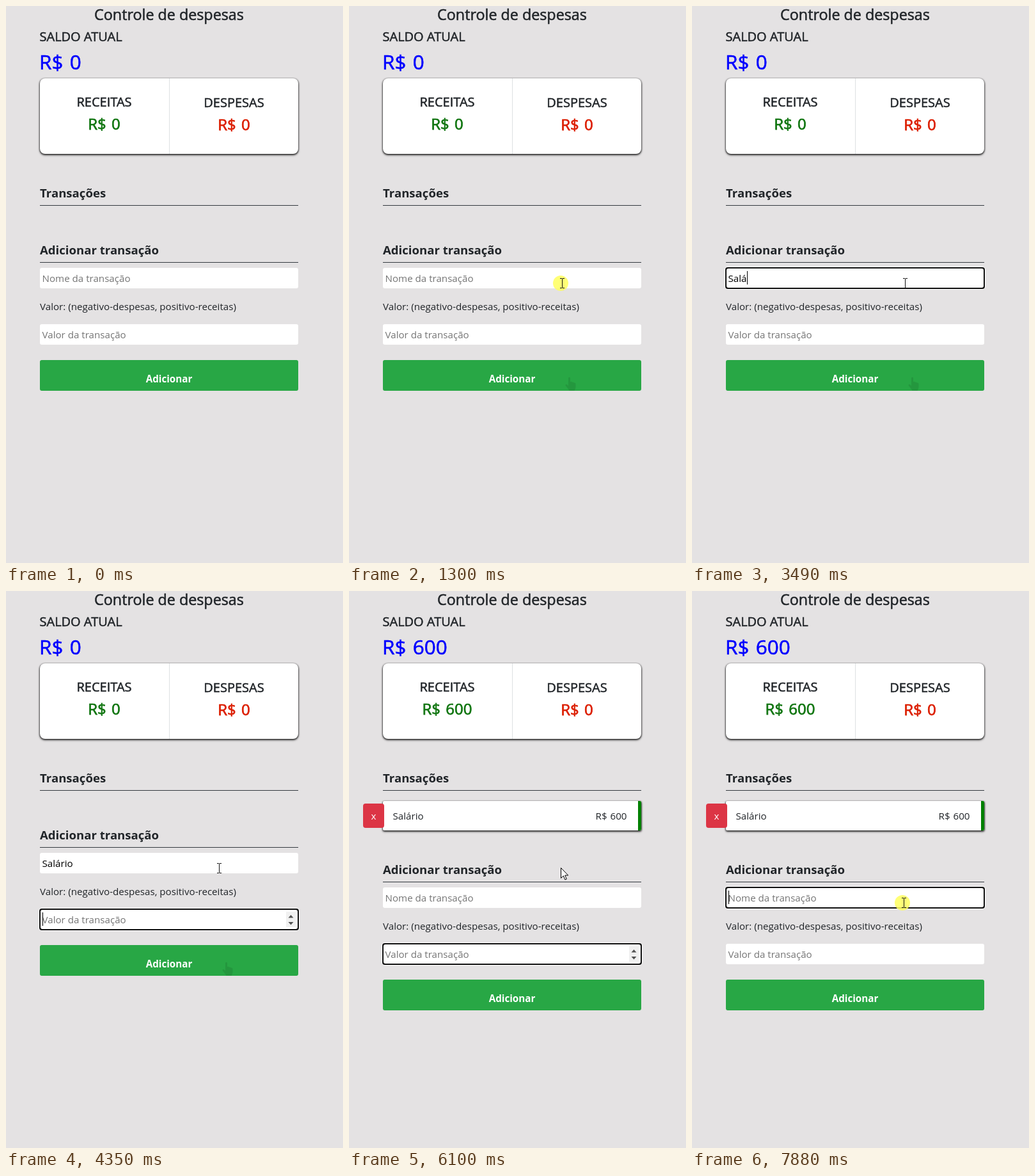
An HTML page that plays this animation: 527x870 px, repeating every 8 s.

```html
<!DOCTYPE html>
<html lang="pt">
<head>
<meta charset="utf-8">
<title>Controle de despesas</title>
<style>
  html, body { margin: 0; width: 100%; height: 100%; overflow: hidden; background: #e4e2e3; }
  svg { display: block; width: 527px; height: 870px; font: 15.15px "Open Sans", "Noto Sans", sans-serif; color: #212529; }
  text { fill: currentColor; white-space: pre; }
  .mid { text-anchor: middle; }
  .end { text-anchor: end; }
  .medium { stroke: currentColor; stroke-width: .55px; }
  .title { font-size: 23.3px; }
  .label { font-size: 20px; }
  .total { font-size: 31.5px; word-spacing: 2px; color: #00f; }
  .sum { font-size: 24px; word-spacing: 2px; stroke-width: .75px; }
  .head { font-size: 18.6px; font-weight: 700; }
  .button { font-size: 15.2px; font-weight: 700; color: #fff; }
  .card { fill: #fff; filter: drop-shadow(0 1px 1.5px #000) drop-shadow(0 1px 1px rgba(0, 0, 0, .4)); }
  .rule { fill: #343a40; }
  .hint { color: #757575; }
  .typed { color: #000; }
  .ring { fill: #fff; }
  .ring + .ring { fill: #101010; }
  .pointer { fill: #fff; stroke: #000; stroke-linejoin: round; }
</style>
</head>
<body>
<svg viewBox="0 0 527 870">
  <text class="title medium mid" x="255" y="22">Controle de despesas</text>
  <text class="label medium" x="52.5" y="55">SALDO ATUAL</text>
  <text class="total medium" x="52" y="99" id="total">R$ 0</text>

  <rect class="card" x="53" y="113" width="404" height="118" rx="8"/>
  <rect x="255" y="113" width="1" height="118" fill="#dee0e2"/>
  <text class="label medium mid" x="153.5" y="157">RECEITAS</text>
  <text class="sum medium mid" x="153.5" y="193" id="income" color="#107510">R$ 0</text>
  <text class="label medium mid" x="356.5" y="158">DESPESAS</text>
  <text class="sum medium mid" x="356.5" y="194" color="#dc1e00">R$ 0</text>

  <text class="head" x="53" y="299">Transações</text>
  <rect class="rule" x="53" y="311" width="404" height="1"/>
  <g id="item">
    <rect class="card" x="53" y="328" width="404" height="46" rx="2"/>
    <path d="M452 328h3q2 0 2 2v42q0 2-2 2h-3Z" fill="#008000"/>
    <text x="68.5" y="357">Salário</text>
    <text class="end" x="434.5" y="357" word-spacing="1">R$ 600</text>
    <rect x="22" y="332" width="33" height="38" rx="4" fill="#dc3545"/>
    <text class="mid" x="38.5" y="357" color="#fff">x</text>
  </g>

  <g id="form">
    <text class="head" x="53" y="388">Adicionar transação</text>
    <rect class="rule" x="53" y="400" width="404" height="1"/>
    <g id="name" transform="translate(53 409)"></g>
    <text x="53" y="475">Valor: (negativo-despesas, positivo-receitas)</text>
    <g id="value" transform="translate(53 497)"></g>
    <rect x="53" y="553" width="404" height="48" rx="3" fill="#28a745"/>
    <text class="button mid" x="255" y="588">Adicionar</text>
  </g>

  <path id="shade" transform="translate(338 579)" fill="#000" fill-opacity=".09"
    d="M5 1.5q1.5-1.5 3 0V8q2-1 3 .5 2-.5 3 1 2.5-.5 2.5 2V16q0 3-2 6H6.5Q5 19 1 14.5-.5 11.5 2.5 12L5 14Z"/>

  <circle id="click" r="12" fill="#ffff5e" fill-opacity=".85"/>
  <g id="cursor">
    <path id="arrow" class="pointer" d="M.5 .5V16.5l3.8-3.6 2.6 6 2.4-1-2.6-5.8h5Z"/>
    <path id="beam" fill="none" stroke="#111" d="M-3 -7.5h2.5q1 0 1 1 0-1 1-1H4M.5-7V7M-3 7.5h2.5q1 0 1-1 0 1 1 1H4"/>
    <path id="hand" class="pointer" transform="translate(-6 0)"
      d="M5 1.5q1.5-1.5 3 0V8q2-1 3 .5 2-.5 3 1 2.5-.5 2.5 2V16q0 3-2 6H6.5Q5 19 1 14.5-.5 11.5 2.5 12L5 14Z"/>
  </g>
</svg>
<script>
const LOOP = 8000;
const ADDED = 6100;
const $ = id => document.getElementById(id);
const show = (el, on) => el.setAttribute('visibility', on ? 'visible' : 'hidden');
const move = (el, x, y) => el.setAttribute('transform', `translate(${x} ${y})`);
const within = (t, from, to) => t >= from && t < to;

// Last entry whose time has been reached
const at = (track, t) => track.filter(step => step[0] <= t).pop();

const focusTrack = [[0, ''], [1370, 'name'], [4350, 'value'], [7880, 'name']];
const caretTrack = [[0, 0], [1370, 1], [1900, 0], [2110, 1], [2890, 0], [3090, 1],
  [4900, 0], [5100, 1], [6020, 0], [6550, 1], [7080, 0], [7610, 1]];

const typing = (word, times) =>
  [[0, ''], ...times.map((time, i) => [time, word.slice(0, i + 1)]), [ADDED, '']];
const nameTrack = typing('Salário', [2110, 2360, 3090, 3490, 3620, 3820, 3950]);
const valueTrack = typing('600', [5100, 5360, 5500]);

const cursorTrack = [
  [0, ''], [260, 'arrow', 437, 717], [330, 'arrow', 408, 714], [400, 'arrow', 371, 646],
  [470, 'hand', 344, 579], [540, 'arrow', 337, 538], [610, 'beam', 334, 500],
  [680, 'beam', 333, 465], [760, 'beam', 333, 461], [830, 'beam', 333, 458],
  [900, 'beam', 333, 455], [970, 'beam', 333, 452], [1030, 'beam', 333, 450],
  [1100, 'beam', 333, 442], [1185, 'beam', 333, 436], [1270, 'beam', 333, 433],
  [6020, 'arrow', 331, 432], [7350, 'arrow', 331, 436], [7440, 'arrow', 331, 446],
  [7530, 'arrow', 331, 457], [7620, 'beam', 331, 470], [7700, 'beam', 331, 481],
  [7790, 'beam', 331, 487]];

function makeField(id, hint, spinner) {
  const g = $(id);
  g.innerHTML = `
    <g class="focus">
      <rect class="ring" x="-2" y="-2" width="408" height="36" rx="5"/>
      <rect class="ring" x="-1" y="-1" width="406" height="34" rx="4"/>
    </g>
    <rect class="box" fill="#fff" rx="3"/>
    <text class="hint" x="3.5" y="22">${hint}</text>
    <text class="typed" x="3.5" y="22"></text>
    <rect class="caret" y="5" width="1" height="21"/>
    <g class="spin">${spinner ? `
      <rect x="385" y="4" width="15" height="24" fill="#f0f0f0"/>
      <path d="M388.5 13.5l4-4.5 4 4.5ZM388.5 20l4 4.5 4-4.5Z" fill="#505050"/>` : ''}
    </g>`;
  const part = name => g.querySelector('.' + name);
  const [ring, box, tip, typed, caret, spin] =
    ['focus', 'box', 'hint', 'typed', 'caret', 'spin'].map(part);

  return (text, focused, caretOn, hover) => {
    const inset = focused ? 1 : 0;
    box.setAttribute('x', inset);
    box.setAttribute('y', inset);
    box.setAttribute('width', 404 - 2 * inset);
    box.setAttribute('height', 32 - 2 * inset);
    typed.textContent = text;
    caret.setAttribute('x', 4 + Math.round(text ? typed.getComputedTextLength() : 0));
    show(ring, focused);
    show(tip, !text);
    show(caret, focused && caretOn);
    show(spin, focused || hover);
  };
}

const drawName = makeField('name', 'Nome da transação', false);
const drawValue = makeField('value', 'Valor da transação', true);

function draw(t) {
  const added = t >= ADDED;
  const focus = at(focusTrack, t)[1];
  const caretOn = at(caretTrack, t)[1];
  const [, kind, x = 0, y = 0] = at(cursorTrack, t);

  $('total').textContent = $('income').textContent = added ? 'R$ 600' : 'R$ 0';
  show($('item'), added);
  move($('form'), 0, added ? 54 : 0);
  drawName(at(nameTrack, t)[1], focus === 'name', caretOn, false);
  drawValue(at(valueTrack, t)[1], focus === 'value', caretOn, within(t, 610, 680));

  show($('shade'), within(t, 540, ADDED));
  show($('click'), within(t, 1270, 1440) || t >= 7790);
  move($('click'), x - 2, y);
  move($('cursor'), x, y);
  for (const id of ['arrow', 'beam', 'hand']) show($(id), id === kind);
}

const start = performance.now();
function tick() {
  draw((performance.now() - start) % LOOP);
  requestAnimationFrame(tick);
}
tick();
</script>
</body>
</html>
```
